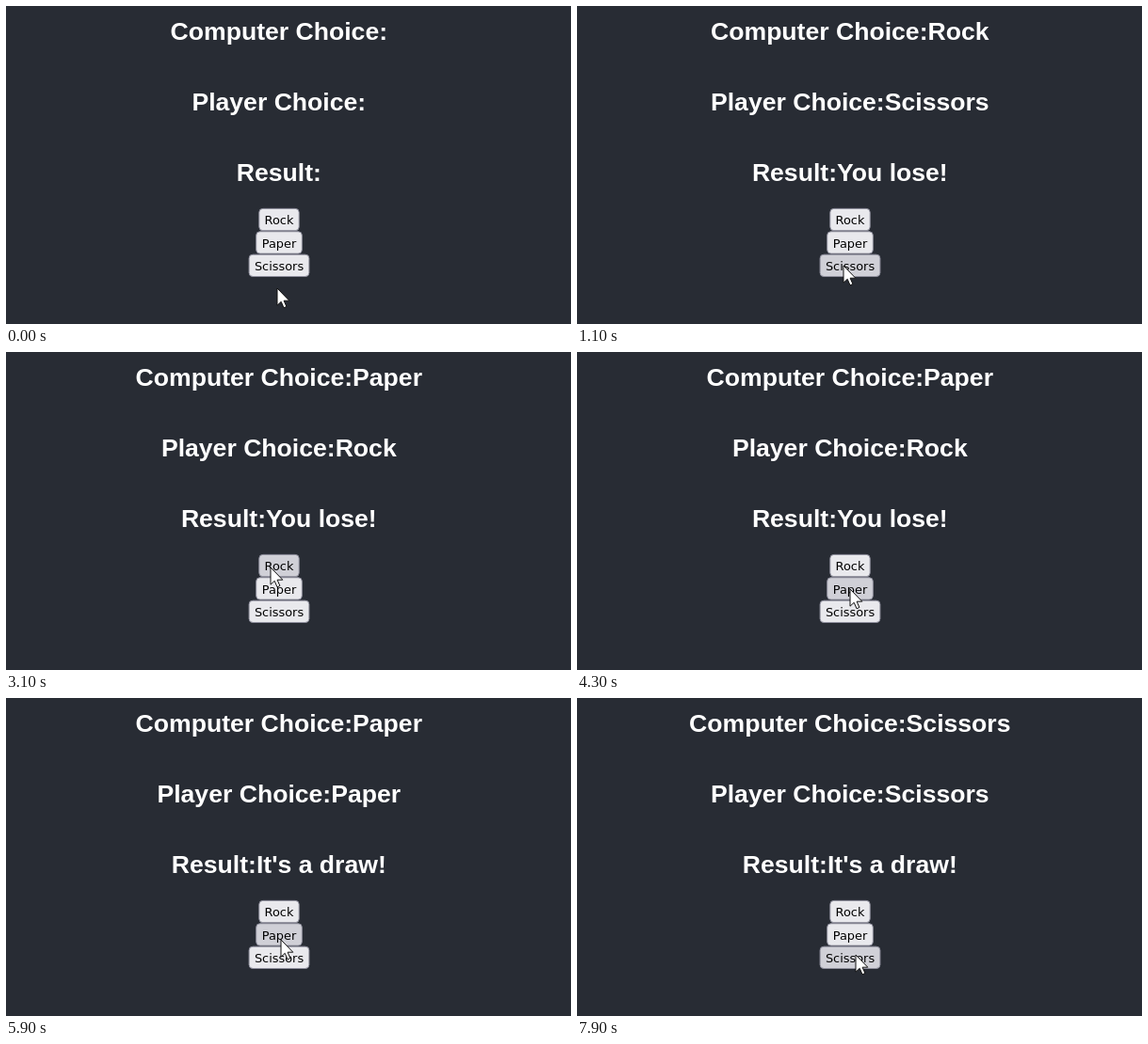
Recreate the animation shown at these times as an HTML page. Size 600 px wide and 338 px high, loop 8 s.

```html
<!DOCTYPE html>
<html lang="en">
<head>
<meta charset="utf-8">
<title>Rock Paper Scissors</title>
<style>
  html, body { margin: 0; height: 100%; overflow: hidden; background: #282c34; }
  svg { display: block; width: 600px; height: 338px; }
  text { text-anchor: middle; }
  .heading { font: bold 26.6px "Liberation Sans", Arial, sans-serif; fill: #fff; }
  .label { font: 12.9px "DejaVu Sans", sans-serif; fill: #000; }
  rect { stroke: #8f8f9d; }
</style>
</head>
<body>
<svg viewBox="0 0 600 338">
  <g id="stage"></g>
  <path id="cursor" d="M0 0V18.2L4.2 14.3L7 20.8L9.9 19.5L7.1 13.2H12.8Z" fill="#fff" stroke="#111" stroke-width="1"/>
</svg>
<script>
const LOOP = 8000, STEP = 100, CENTER = 289.8;
const stage = document.getElementById('stage');
const cursor = document.getElementById('cursor');

function add(tag, attrs, text = '') {
  const el = document.createElementNS('http://www.w3.org/2000/svg', tag);
  for (const name in attrs) el.setAttribute(name, attrs[name]);
  el.textContent = text;
  return stage.appendChild(el);
}

const titles = ['Computer Choice:', 'Player Choice:', 'Result:'];
const headings = titles.map((_, i) => add('text', { class: 'heading', x: CENTER, y: 36 + 75 * i }));

const buttons = [['Rock', 42.4], ['Paper', 48.6], ['Scissors', 63.8]].map(([name, width], i) => {
  const top = 215.4 + 24.4 * i;
  const box = add('rect', { x: CENTER + 0.2 - width / 2, y: top, width, height: 23.3, rx: 4 });
  add('text', { class: 'label', x: CENTER + 0.2, y: top + 16.7 }, name);
  return { box, top };
});

// Each round: time of the press; the answers appear one step later.
const rounds = [
  [600, 'Rock', 'Scissors', 'You lose!'],
  [2700, 'Paper', 'Rock', 'You lose!'],
  [5000, 'Paper', 'Paper', "It's a draw!"],
  [7000, 'Scissors', 'Scissors', "It's a draw!"]
];

// Cursor path: time, x, y
const path = [
  [0, 288, 300], [300, 283, 276], [1800, 283, 276], [2300, 281, 229],
  [3200, 281, 229], [4100, 292, 257], [4300, 290, 252], [4500, 292, 257],
  [5900, 292, 257], [6300, 302, 277], [7800, 302, 277], [7900, 296, 273], [LOOP, 296, 273]
];

function cursorAt(t) {
  const i = path.findIndex(p => p[0] > t);
  const [t0, x0, y0] = path[i - 1], [t1, x1, y1] = path[i];
  const u = (t - t0) / (t1 - t0), k = u * u * (3 - 2 * u);
  return [x0 + (x1 - x0) * k, y0 + (y1 - y0) * k];
}

function draw(now) {
  const t = Math.floor(now % LOOP / STEP) * STEP;
  const [x, y] = cursorAt(t);
  const round = rounds.findLast(r => t >= r[0] + STEP) || [];
  const pressed = rounds.some(r => t === r[0]);

  headings.forEach((el, i) => el.textContent = titles[i] + (round[i + 1] || ''));
  for (const { box, top } of buttons) {
    const hover = y >= top && y < top + 24.4;
    box.setAttribute('fill', !hover ? '#e9e9ed' : pressed ? '#b1b1b9' : '#d0d0d7');
  }
  cursor.setAttribute('transform', `translate(${x} ${y})`);
  requestAnimationFrame(() => draw(performance.now() - start));
}

const start = performance.now();
draw(0);
</script>
</body>
</html>
```
